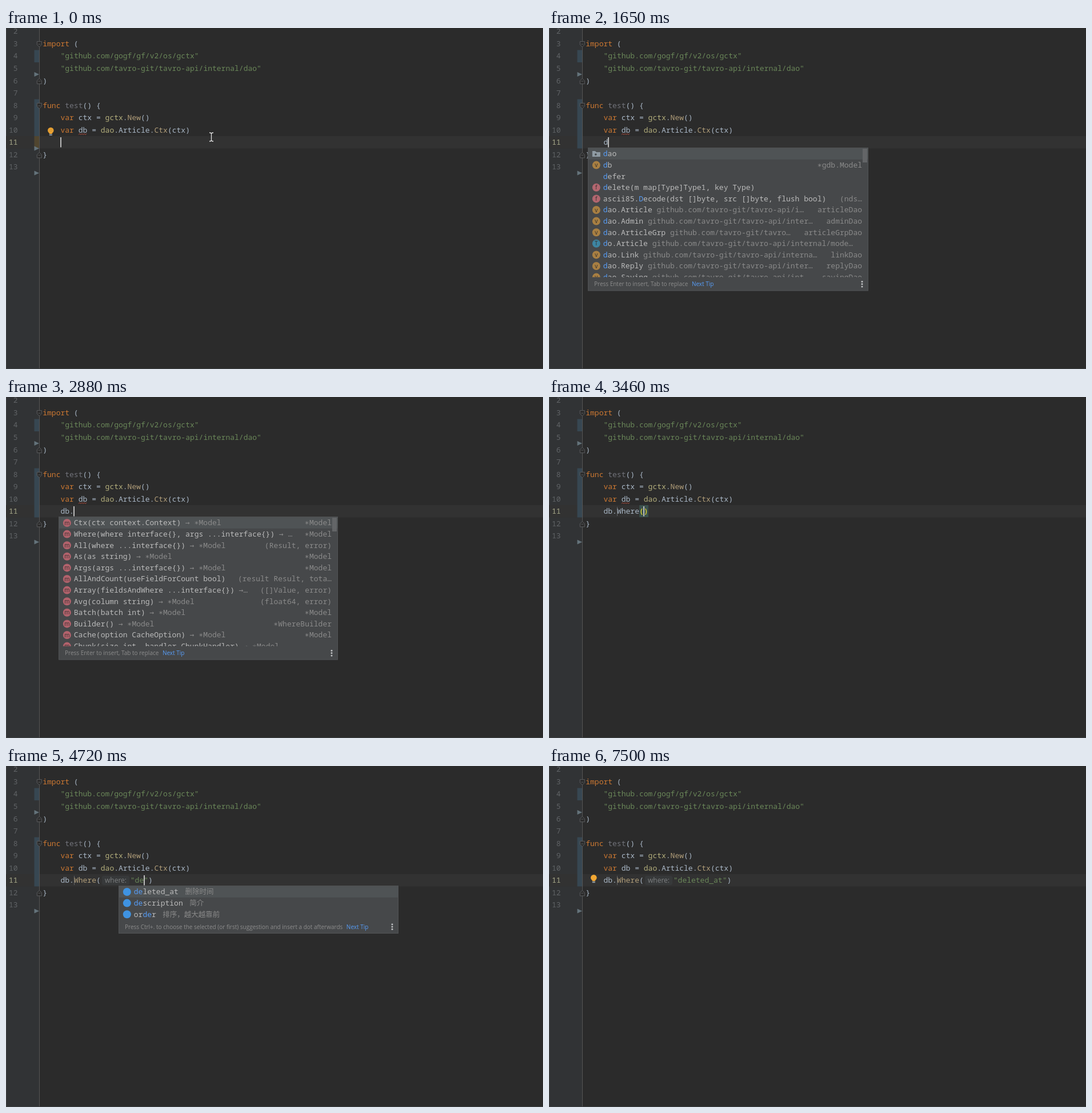
Animation of 940 by 596 pixels, one loop 7.83 s. Source, as an HTML page with a canvas:

```html
<!DOCTYPE html>
<html lang="en">
<head>
<meta charset="utf-8">
<title>Code completion</title>
<style>
html, body { margin: 0; width: 100%; height: 100%; overflow: hidden; background: #2b2b2b; }
canvas { display: block; }
</style>
</head>
<body>
<canvas id="stage" width="940" height="596"></canvas>
<script>
const LOOP = 7830, CHAR = 7.82, LINE = 21.55, ROW = 19.6;
const MONO = `${CHAR / 0.6}px "Noto Sans Mono", "DejaVu Sans Mono", "Noto Sans CJK SC", monospace`;
const ARROW = '13px "DejaVu Sans Mono", monospace';
const SANS = '"Open Sans", sans-serif';
const CJK = '12.5px "Noto Sans CJK SC", "Noto Sans CJK", sans-serif';
const C = {
  text: '#a9b7c6', key: '#cc7832', str: '#6a8759', pkg: '#b3ae7c', call: '#b09d79',
  dim: '#72737a', grey: '#8a8a8a', item: '#bbbbbb', link: '#589df6', number: '#606366'
};
const g = document.getElementById('stage').getContext('2d');

const rect = (x, y, w, h, color) => { g.fillStyle = color; g.fillRect(x, y, w, h); };
const centerOf = line => 28 + (line - 3) * LINE;
const baseOf = line => Math.round(centerOf(line) + 3.9);
const colX = col => 64.2 + col * CHAR;
const between = (t, a, b) => t >= a && t < b;
const latest = (t, steps) => steps.filter(s => t >= s[0]).pop();

function text(str, x, y, color, font = MONO, align = 'left') {
  g.font = font;
  g.textAlign = align;
  g.fillStyle = color;
  g.fillText(str, x, y);
  return x + g.measureText(str).width;
}
function runs(x, y, ...parts) {
  for (let i = 0; i < parts.length; i += 2) x = text(parts[i], x, y, C[parts[i + 1]]);
  return x;
}
function shape(points, fill, stroke) {
  g.beginPath();
  points.forEach(([x, y]) => g.lineTo(x, y));
  g.closePath();
  if (fill) { g.fillStyle = fill; g.fill(); }
  if (stroke) { g.strokeStyle = stroke; g.lineWidth = 1; g.stroke(); }
}
function disc(x, y, r, color) {
  g.fillStyle = color;
  g.beginPath();
  g.arc(x, y, r, 0, 7);
  g.fill();
}

// Completion rows: icon, name, grey tail, right-hand type
const repo = 'github.com/tavro-git/tavro-api/';
const basics = [
  ['dir', 'dao'],
  ['v', 'db', '', '∗gdb.Model'],
  ['', 'defer'],
  ['f', 'delete(m map[Type]Type1, key Type)'],
  ['f', 'ascii85.Decode(dst []byte, src []byte, flush bool)', '', '(nds…']
];
const shortList = [
  ...basics,
  ['i', 'ast.Decl', 'go/ast'],
  ['t', 'ast.DeclStmt', 'go/ast'],
  ['t', 'ast.DeferStmt', 'go/ast']
];
const longList = [
  ...basics,
  ['v', 'dao.Article', repo + 'i…', 'articleDao'],
  ['v', 'dao.Admin', repo + 'inter…', 'adminDao'],
  ['v', 'dao.ArticleGrp', repo.slice(0, 26) + '…', 'articleGrpDao'],
  ['t', 'do.Article', repo + 'internal/mode…'],
  ['v', 'dao.Link', repo + 'interna…', 'linkDao'],
  ['v', 'dao.Reply', repo + 'inter…', 'replyDao'],
  ['v', 'dao.Saying', repo + 'int…', 'sayingDao']
];
const methods = [
  ['Ctx(ctx context.Context)', '→ ∗Model', '∗Model'],
  ['Where(where interface{}, args ...interface{})', '→ …', '∗Model'],
  ['All(where ...interface{})', '→ ∗Model', '(Result, error)'],
  ['As(as string)', '→ ∗Model', '∗Model'],
  ['Args(args ...interface{})', '→ ∗Model', '∗Model'],
  ['AllAndCount(useFieldForCount bool)', '', '(result Result, tota…'],
  ['Array(fieldsAndWhere ...interface{})', '→…', '([]Value, error)'],
  ['Avg(column string)', '→ ∗Model', '(float64, error)'],
  ['Batch(batch int)', '→ ∗Model', '∗Model'],
  ['Builder()', '→ ∗Model', '∗WhereBuilder'],
  ['Cache(option CacheOption)', '→ ∗Model', '∗Model'],
  ['Chunk(size int, handler ChunkHandler)', '→ ∗Model']
].map(row => ['m', ...row]);
const fields = [
  ['db', 'deleted_at', '删除时间'],
  ['db', 'description', '简介'],
  ['db', 'order', '排序，越大越靠前'],
  ['db', 'id', '主键'],
  ['db', 'created_at', '创建时间'],
  ['db', 'updated_at', '更新时间'],
  ['db', 'grp_id', '分组'],
  ['db', 'hidden', '隐藏']
];
const insertTip = 'Press Enter to insert, Tab to replace';
const dotTip = 'Press Ctrl+. to choose the selected (or first) suggestion and insert a dot afterwards';

// Start, end, left, right, rows, visible rows, selected row, focused, prefix, tip, scroll thumb
const popups = [
  [1320, 1390, 68, 557.5, shortList, 8, 0, false, 'd', insertTip, 46],
  [1390, 2250, 68, 559, longList, 11.5, 0, false, 'd', insertTip, 24],
  [2250, 2450, 68, 559, longList, 11.5, 1, true, 'd', insertTip, 24],
  [2880, 2940, 92, 581, methods, 11.5, 0, false, '', insertTip, 24],
  [2940, 3060, 92, 583, methods, 11.5, 0, false, '', insertTip, 24],
  [3060, 3390, 92, 583, methods, 11.5, 1, true, '', insertTip, 24],
  [4530, 4720, 197, 687, fields, 8, 0, false, 'd', insertTip, 0],
  [4720, 5450, 197, 687, fields, 3, 0, false, 'de', dotTip, 0]
];
const iconColor = { v: '#a87f42', f: '#b2666f', m: '#b2626c', i: '#56863f', t: '#3d85a2', db: '#3f93e2' };

function icon(kind, x, y) {
  if (kind === 'dir') {
    shape([[x - 7, y - 5], [x - 2, y - 5], [x, y - 3], [x + 7, y - 3], [x + 7, y + 5], [x - 7, y + 5]], '#8f9ba3');
    disc(x - 1, y + 1, 1.8, '#45494b');
  } else if (kind) {
    disc(x, y, 7, iconColor[kind]);
    if (kind !== 'db') {
      const letter = 'it'.includes(kind) ? kind.toUpperCase() : kind;
      text(letter, x, y + 3.5, '#34302f', '10px ' + SANS, 'center');
    }
  }
}

function popup([, , left, right, rows, visible, selected, focused, prefix, tip, thumb]) {
  const top = 209, listEnd = top + 1 + visible * ROW, bottom = listEnd + 24;
  rect(left, top, right - left, bottom - top, '#46484a');
  g.save();
  g.beginPath();
  g.rect(left, top, right - left, listEnd - top);
  g.clip();
  rows.slice(0, Math.ceil(visible)).forEach(([kind, name, tail = '', type = ''], i) => {
    const y = 220 + i * ROW, base = Math.round(y + 4.3);
    if (i === selected) rect(left, y - ROW / 2, right - left, ROW, focused ? '#113a5c' : '#4f5355');
    icon(kind, left + 14.8, y);
    const isField = kind === 'db', hit = name.toLowerCase().indexOf(prefix);
    const end = runs(left + 26.8, base, name.slice(0, hit), 'item',
      name.slice(hit, hit + prefix.length), 'link', name.slice(hit + prefix.length), 'item');
    let x = end + (isField ? 11.5 : CHAR);
    if (tail[0] === '→') {
      x = text('→', x, base, C.grey, ARROW);
      tail = tail.slice(1);
    }
    text(tail, x, base, C.grey, isField ? CJK : MONO);
    text(type, right - 11, base, C.grey, MONO, 'right');
  });
  if (thumb) rect(right - 10, 211, 8, thumb, '#636567');
  g.restore();
  const tipBase = Math.round(listEnd + 16);
  const tipEnd = text(tip, left + 11, tipBase, '#8c8c8c', '10px ' + SANS);
  text('Next Tip', tipEnd + 6.6, tipBase, C.link, '10px ' + SANS);
  for (let i = -1; i < 2; i++) disc(right - 11, listEnd + 12.2 + i * 4.3, 1.5, '#c0c2c4');
  g.strokeStyle = '#515355';
  g.lineWidth = 1;
  g.strokeRect(left + 0.5, top + 0.5, right - left - 1, bottom - top - 1);
}

function fold(line, dir) {
  const y = centerOf(line) + 0.3, x = 58.3;
  shape([[x - 4, y - 4.7 * dir], [x + 4, y - 4.7 * dir], [x + 4, y + dir], [x, y + 4.7 * dir], [x - 4, y + dir]],
    '#2b2b2b', '#5a5c5e');
  rect(x - 2, y - 0.5, 4, 1, '#5a5c5e');
}
const arrow = y => shape([[49.5, y - 4], [58, y], [49.5, y + 4]], '#64737b');

function bulb(y, alpha) {
  g.globalAlpha = alpha;
  disc(78.3, y, 5.3, '#f2a733');
  rect(75.8, y + 3, 5, 3, '#f2a733');
  rect(75.8, y + 6.5, 5, 2.5, '#8b959b');
  g.globalAlpha = 1;
}

function mouse(x, y) {
  g.strokeStyle = '#e4e4e4';
  g.lineWidth = 1.3;
  g.beginPath();
  for (const d of [-1, 1]) {
    g.moveTo(x - 3.5, y + 7.5 * d);
    g.quadraticCurveTo(x, y + 7.5 * d, x, y + 5.5 * d);
    g.quadraticCurveTo(x, y + 7.5 * d, x + 3.5, y + 7.5 * d);
  }
  g.moveTo(x, y - 6);
  g.lineTo(x, y + 6);
  g.stroke();
}

function wave(x, y, width) {
  g.strokeStyle = '#bc4f3c';
  g.lineWidth = 1;
  g.beginPath();
  for (let i = 0; i <= width; i += 2) g.lineTo(x + i, y + (i % 4 ? -1 : 1));
  g.stroke();
}

function editor(t) {
  rect(0, 0, 940, 596, '#2b2b2b');
  rect(0, 0, 58, 596, '#313335');
  rect(0, 0, 1, 596, '#3f4244');
  rect(0, 189, 940, 21.5, '#323232');
  rect(49.5, 38.5, 8.5, 21.5, '#374752');
  rect(49.5, 124.5, 8.5, 64.5, '#374752');
  rect(49.5, 189, 8.5, 21.5, t < 1250 ? '#50452f' : '#374752');
  rect(58, 0, 1, 596, '#555555');
  rect(0, 595, 940, 1, '#3c3f41');
  for (let n = 2; n < 14; n++) text(n, 20.5, baseOf(n), n === 11 ? '#a9ab8b' : C.number, MONO, 'right');
  fold(3, 1);
  fold(6, -1);
  fold(8, 1);
  fold(12, -1);
  arrow(81);
  arrow(253.5);
  if (t < 1110) arrow(210.5);

  if (between(t, 2450, 2740)) {
    rect(colX(8), 168, 2 * CHAR, 21, '#40332b');
    rect(colX(4), 189, 2 * CHAR, 21, '#344134');
  }
  runs(colX(0), baseOf(3), 'import ', 'key', '(', 'text');
  runs(colX(4), baseOf(4), '"github.com/gogf/gf/v2/os/gctx"', 'str');
  runs(colX(4), baseOf(5), `"${repo}internal/dao"`, 'str');
  runs(colX(0), baseOf(6), ')', 'text');
  runs(colX(0), baseOf(8), 'func ', 'key', 'test', 'dim', '() {', 'text');
  runs(colX(4), baseOf(9), 'var ', 'key', 'ctx = ', 'text', 'gctx', 'pkg', '.', 'text', 'New', 'call', '()', 'text');
  runs(colX(4), baseOf(10), 'var ', 'key', 'db = ', 'text', 'dao', 'pkg', '.Article.', 'text', 'Ctx', 'call', '(ctx)', 'text');
  runs(colX(0), baseOf(12), '}', 'text');
  if (t < 4120) wave(127, 185.5, 15);
}

// Typed line: returns the caret position
function typedLine(t) {
  const y = baseOf(11), start = colX(4);
  if (t < 3390) {
    const [, typed] = latest(t, [[0, ''], [1110, 'd'], [2450, 'db'], [2650, 'db.']]);
    return runs(start, y, typed, 'text');
  }
  rect(119, 192, 1, 16, '#626466');
  const parens = between(t, 3460, 3790);
  if (parens) rect(158.2, 189, 2 * CHAR, 21, '#3b514d');
  let x = runs(start, y, 'db.', 'text', 'Where', t < 4120 ? 'text' : 'call');
  const paren = parens ? '#ffef28' : C.text;
  x = text('(', x, y, paren);
  if (t >= 4120) {
    g.fillStyle = '#37393a';
    g.beginPath();
    g.roundRect(168, 192, 48, 16, 3);
    g.fill();
    text('where:', 173, 204, '#7d7f80', '12px ' + SANS);
    x += 52;
  }
  let caret = x;
  if (t >= 3790) {
    const [, value] = latest(t, [[3790, ''], [4460, 'd'], [4650, 'de'], [5450, 'deleted_at']]);
    caret = runs(x, y, '"' + value, 'str');
    x = runs(caret, y, '"', 'str');
  }
  text(')', x, y, paren);
  return caret;
}

const caretOff = [[240, 770], [1710, 2250], [6440, 6970], [7500, LOOP]];

function draw(t) {
  editor(t);
  const caret = typedLine(t);
  if (!caretOff.some(([a, b]) => between(t, a, b))) rect(Math.floor(caret), 191, 2, 17.5, '#bbbbbb');
  if (t < 1110) {
    bulb(179, 0.92);
    mouse(359.5, 190.5);
  }
  if (t >= 6310) bulb(195.2, t < 6440 ? 0.5 : 1);
  const open = popups.find(([a, b]) => between(t, a, b));
  if (open) popup(open);
}

const began = performance.now();
function tick() {
  draw((performance.now() - began) % LOOP);
  requestAnimationFrame(tick);
}
tick();
</script>
</body>
</html>
```
